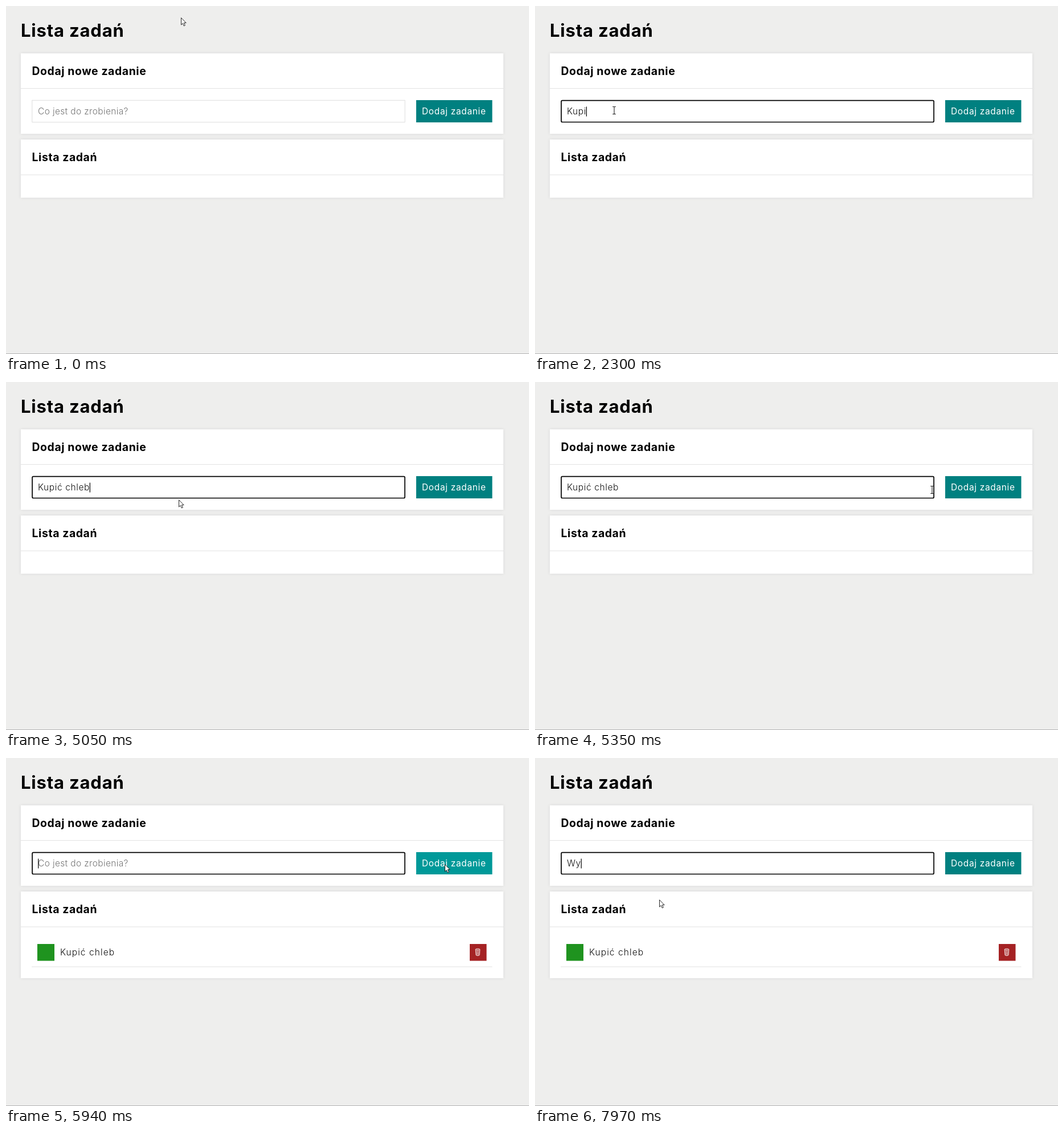
Recreate the animation shown at these times as an HTML page. Size 918 by 610 pixels, loop 8 s.

```html
<!DOCTYPE html>
<html lang="pl">
<head>
<meta charset="utf-8">
<title>Lista zadań</title>
<style>
  html, body { margin: 0; width: 100%; height: 100%; overflow: hidden; background: #eeeeed; }
  svg { display: block; width: 100vw; height: 100vh; }
  text { font-family: Inter, "Open Sans", sans-serif; font-size: 15.5px; white-space: pre; }
  .title { font-size: 31px; font-weight: 700; letter-spacing: .8px; }
  .head { font-size: 19.4px; font-weight: 700; letter-spacing: .6px; }
  .typed { font-weight: 350; letter-spacing: .6px; fill: #111; }
  .hint { font-weight: 350; letter-spacing: .36px; fill: #757575; }
  .label { letter-spacing: .65px; fill: #fff; }
  .task { font-weight: 350; letter-spacing: 1.07px; fill: #111; }
  .card { fill: #fff; filter: drop-shadow(0 0 2.5px #d8d8d8); }
  .rule { fill: #e2e2e2; }
</style>
</head>
<body>
<svg viewBox="0 0 918 610">
  <rect width="918" height="610" fill="#eeeeed"/>
  <rect y="609" width="918" height="1" fill="#b4b4b4"/>
  <text class="title" x="26" y="54">Lista zadań</text>

  <rect class="card" x="26" y="83" width="847" height="141"/>
  <rect class="rule" x="26" y="144" width="847" height="1"/>
  <text class="head" x="45.5" y="120.5">Dodaj nowe zadanie</text>
  <rect id="field" fill="#fff"/>
  <text id="hint" class="hint" x="56" y="190">Co jest do zrobienia?</text>
  <text id="typed" class="typed" x="56" y="190"></text>
  <rect id="caret" y="176.5" width="1.2" height="17" fill="#000"/>
  <rect id="button" x="720" y="165" width="133.5" height="39"/>
  <rect id="ring" x="719.7" y="164.7" width="134" height="39.8" rx="2.5" fill="none" stroke="#000" stroke-width="1.7"/>
  <text class="label" x="730" y="190">Dodaj zadanie</text>

  <rect id="list" class="card" x="26" y="234" width="847" height="102"/>
  <rect class="rule" x="26" y="295.5" width="847" height="1"/>
  <text class="head" x="45.5" y="272">Lista zadań</text>
  <g id="item">
    <rect x="55" y="326" width="30" height="29.5" fill="#1f931f"/>
    <text class="task" x="95" y="346">Kupić chleb</text>
    <rect x="814" y="326" width="29.5" height="29.5" fill="#a52224"/>
    <g fill="none" stroke="#fff" stroke-width=".9">
      <ellipse cx="828" cy="335.5" rx="3.8" ry="1.2"/>
      <path d="M824.2 335.5L825 345.6Q828 347.4 831 345.6L831.8 335.5"/>
      <path d="M826.4 337V346M828 337V346M829.6 337V346M824.6 340H831.4M824.9 343H831.1" stroke-width=".5"/>
    </g>
    <rect class="rule" x="45" y="365.5" width="808.5" height="1"/>
  </g>

  <g id="pointer">
    <path id="arrow" d="M.5 .7V13L3.3 10.4 5.2 14.9 7.3 14 5.4 9.6H9.1Z" fill="#fff" stroke="#111" stroke-width=".9"/>
    <path id="beam" d="M-2.8 -6.5H-.8L0 -5.8 .8 -6.5H2.8M0 -5.8V5.8M-2.8 6.5H-.8L0 5.8 .8 6.5H2.8" fill="none" stroke="#222" stroke-width="1.1"/>
    <circle id="press" cx="-.5" cy="-.5" r="12" fill="#ff0" opacity=".46"/>
  </g>
</svg>
<script>
const LOOP = 8000;
const FOCUS = 650, PRESS = 5860, ADD = 5940;
const el = id => document.getElementById(id);
const set = (node, attrs) => {
  for (const key in attrs) node.setAttribute(key, attrs[key]);
};
const show = (id, on) => set(el(id), { visibility: on ? "visible" : "hidden" });

const linear = k => k;
const easeOut = k => Math.sin(k * Math.PI / 2);
const easeInOut = k => (1 - Math.cos(k * Math.PI)) / 2;

// start, end, from, to, easing
const moves = [
  [150, 620, [307, 20], [139, 183], easeInOut],
  [4930, 5050, [139, 183], [301, 206], linear],
  [5050, 5520, [301, 206], [770, 186], easeOut],
  [6220, 6610, [770, 186], [218, 248], easeInOut]
];

const firstKeys = [1900, 2060, 2180, 2300, 2540, 2640, 3260, 3360, 3510, 3610, 4600];
const secondKeys = [7840, 7970];
const blinks = [FOCUS, 1160, 1670, 3160, 3260, 4120, 4600, 5130, 5680, PRESS,
  ADD, 6450, 7000, 7530, 7840];

const passed = (times, t) => times.filter(at => at <= t).length;

function pointerAt(t) {
  let pos = moves[0][2];
  for (const [start, end, from, to, ease] of moves) {
    if (t < start) break;
    const k = ease(Math.min(1, (t - start) / (end - start)));
    pos = from.map((v, i) => v + (to[i] - v) * k);
  }
  return pos.map(Math.round);
}

function render(t) {
  const pressed = t >= PRESS && t < ADD;
  const added = t >= ADD;
  const focused = t >= FOCUS && !pressed;
  const [x, y] = pointerAt(t);
  const inRow = y >= 165 && y < 204;
  const overField = inRow && x >= 46 && x < 701;
  const overButton = inRow && x >= 720 && x < 854;

  const text = added
    ? "Wy".slice(0, passed(secondKeys, t))
    : "Kupić chleb".slice(0, passed(firstKeys, t));
  const typed = el("typed");
  if (typed.textContent !== text) typed.textContent = text;
  show("hint", !text);
  show("caret", passed(blinks, t) % 2 === 1);
  set(el("caret"), { x: text ? 55.8 + typed.getComputedTextLength() : 56.2 });

  set(el("field"), focused
    ? { x: 46.1, y: 165.6, width: 654, height: 37.9, rx: 2, stroke: "#000", "stroke-width": 1.7 }
    : { x: 45.8, y: 165.3, width: 654.4, height: 38.4, rx: 0, stroke: "#dedede", "stroke-width": 1 });
  set(el("button"), { fill: pressed ? "#00b3b3" : overButton ? "#009999" : "#008080" });
  show("ring", pressed);

  set(el("list"), { height: added ? 152 : 102 });
  show("item", added);

  set(el("pointer"), { transform: `translate(${x} ${y})` });
  show("arrow", !overField);
  show("beam", overField);
  show("press", pressed || (t >= FOCUS && t < 680));
}

const began = performance.now();
function tick() {
  render((performance.now() - began) % LOOP);
  requestAnimationFrame(tick);
}
tick();
</script>
</body>
</html>
```
